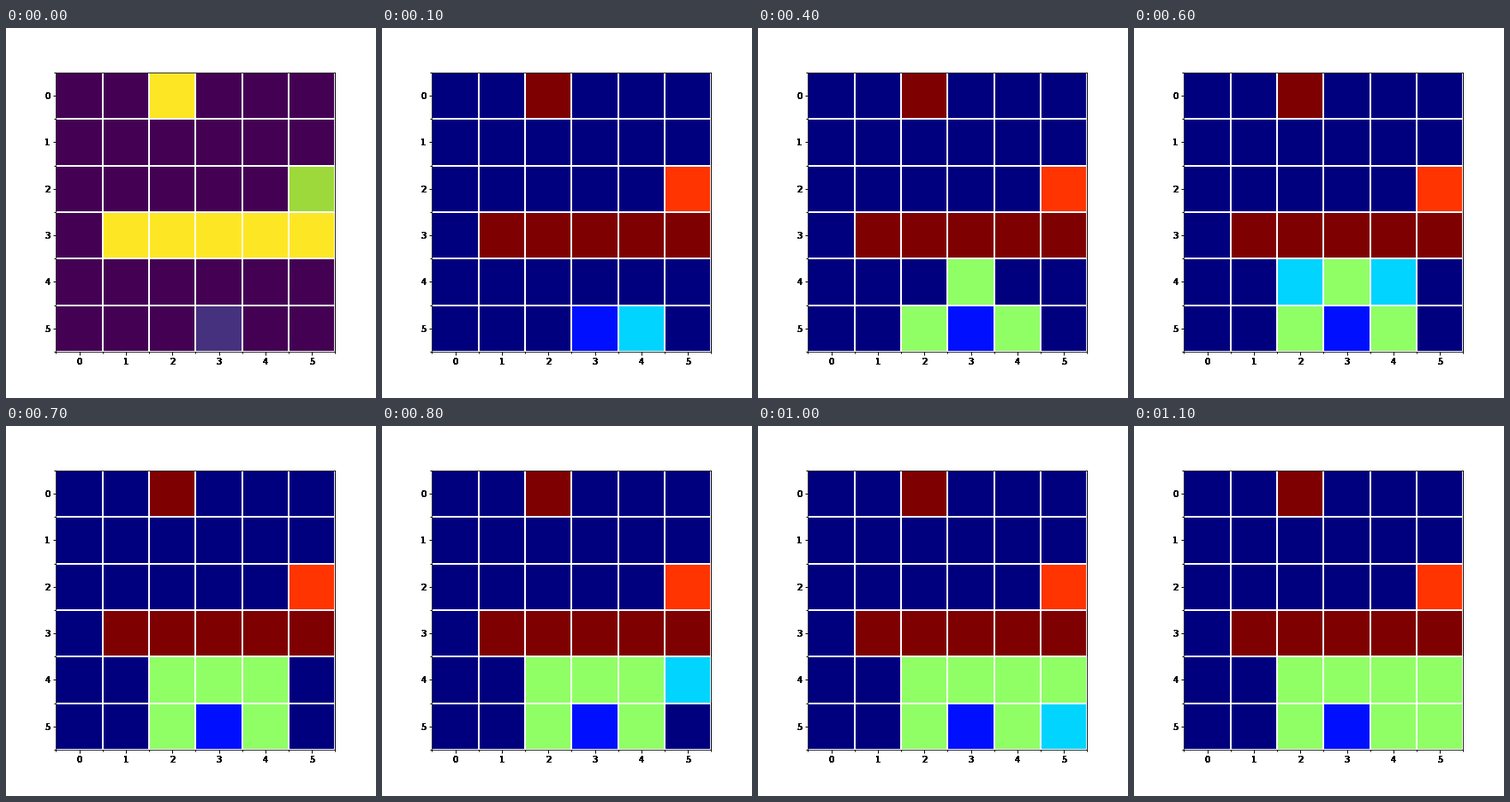
Write a matplotlib script that moves like this. It is 432x432 px and loops after 1.2 s.

```python
import numpy as np
import matplotlib.pyplot as plt
from matplotlib.animation import FuncAnimation

SIZE, FRAMES = 6, 12
START, OPEN, DONE, GOAL, WALL = 0.1425, 1 / 3, 0.525, 0.855, 1.0

# cell: (frame it is opened, frame it is closed)
VISITS = {
    (5, 4): (1, 4), (5, 2): (2, 4), (4, 3): (3, 4),
    (4, 4): (5, 7), (4, 2): (6, 7),
    (4, 5): (8, 9), (5, 5): (10, 11),
}


def grid_at(frame):
    grid = np.zeros((SIZE, SIZE))
    grid[0, 2] = WALL
    grid[3, 1:] = WALL
    grid[2, 5] = GOAL
    grid[5, 3] = START
    for cell, (opened, closed) in VISITS.items():
        if frame >= closed:
            grid[cell] = DONE
        elif frame >= opened:
            grid[cell] = OPEN
    return grid


def label(text, xy, coords, offset, ha, va):
    # Repeated drawing darkens the antialiased edges into heavy digits.
    for _ in range(30):
        ax.annotate(text, xy, xycoords=coords, xytext=offset,
                    textcoords="offset points", ha=ha, va=va, fontsize=10)


plt.rcParams["font.family"] = "DejaVu Sans"
fig, ax = plt.subplots(figsize=(6, 6), dpi=72, facecolor="white")
fig.subplots_adjust(left=0.125, right=0.9, bottom=0.125, top=0.88)
image = ax.imshow(grid_at(0), cmap="viridis", vmin=0, vmax=1)

cells, edges = np.arange(SIZE), np.arange(-0.5, SIZE)
for axis in (ax.xaxis, ax.yaxis):
    axis.set_ticks(cells)
    axis.set_ticks(edges, minor=True)
ax.tick_params(which="both", width=1, labelbottom=False, labelleft=False)
ax.grid(which="minor", color="white", linestyle="-", linewidth=2)

for i in cells:
    label(str(i), (i, 0), ax.get_xaxis_transform(), (0, -7), "center", "top")
    label(str(i), (0, i), ax.get_yaxis_transform(), (-7, 0), "right", "center_baseline")


def update(frame):
    image.set_data(grid_at(frame))
    image.set_cmap("jet" if frame else "viridis")
    return [image]


anim = FuncAnimation(fig, update, frames=FRAMES, interval=100,
                     repeat=True, repeat_delay=0, blit=False)
plt.show()
```
